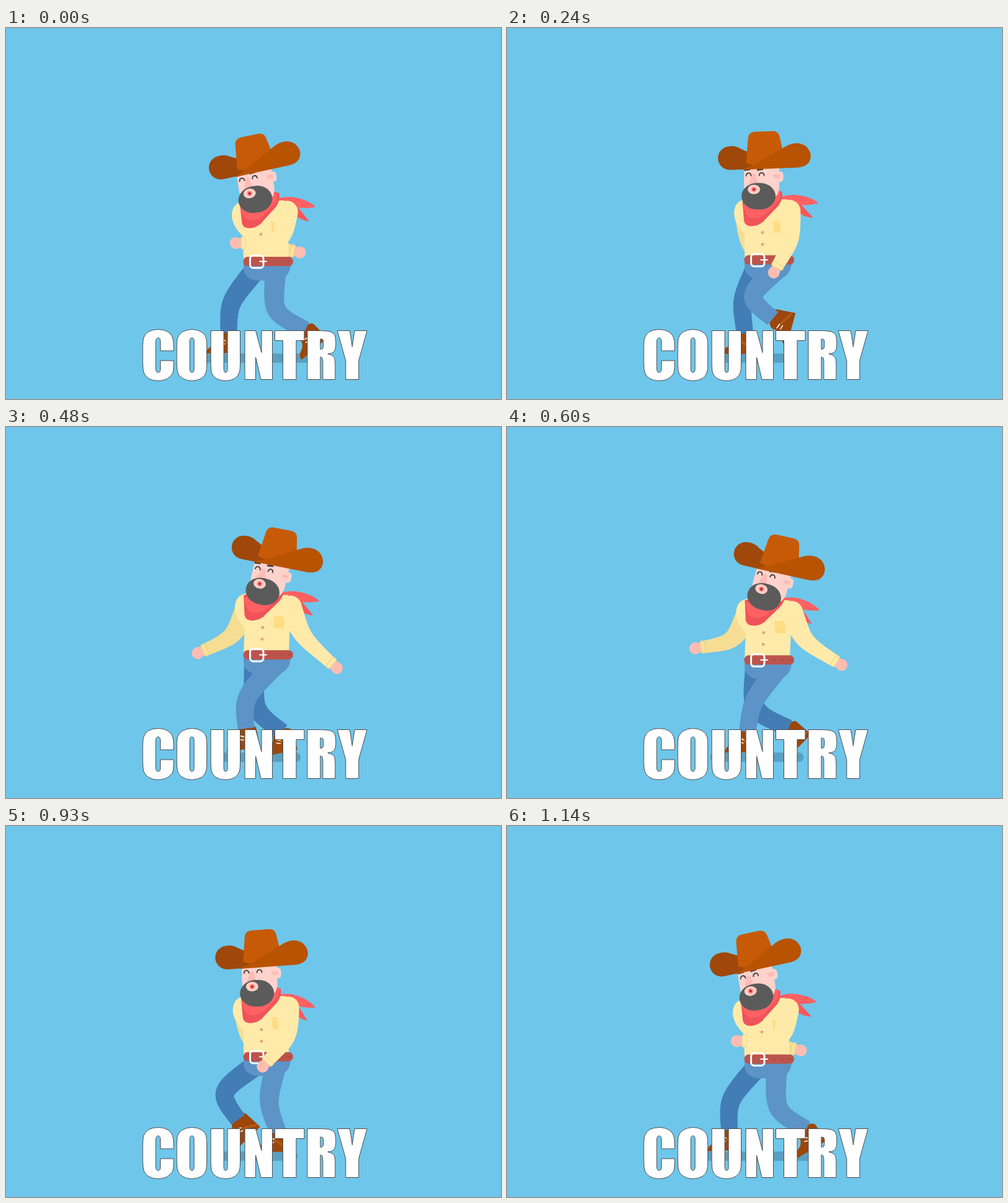
These frames come from a looping animation (800 by 600 pixels, 1.17 s). An HTML page:

```html
<!DOCTYPE html>
<html lang="en">
<head>
<meta charset="utf-8">
<title>Country walk</title>
<style>
html, body { margin: 0; width: 100%; height: 100%; overflow: hidden; background: #6ec6eb; }
svg { display: block; width: 100vw; height: 100vh; }
</style>
</head>
<body>
<svg viewBox="0 0 800 600">
  <defs>
    <g id="boot">
      <path fill="#9c460b" d="M-16 3Q-14-3 0-5Q13-5 16 1L18 33H-36Q-37 25-27 21Q-17 17-16 3Z"/>
      <path stroke="#ae5a18" stroke-width="4" d="M16 27L-11 11"/>
      <path stroke="#fff" stroke-width="1.6" stroke-linecap="round" d="M-13 10L-6 12.5M-13 16L-7 18"/>
    </g>
    <g id="hand" fill="#ffbdb2">
      <circle cx="11" r="9.6"/>
      <rect x="-1" y="-8" width="12" height="16" rx="4"/>
    </g>
  </defs>
  <rect width="800" height="600" fill="#6ec6eb"/>
  <rect id="shadow" y="526.5" height="15" rx="7.5" fill="#5a9fbf"/>

  <use id="bootB" href="#boot"/>
  <path id="legB" fill="#427db6"/>

  <use id="handB" href="#hand"/>
  <path id="armB" fill="#f5dd93"/>
  <rect id="cuffB" x="-5" y="-10" width="7" height="20" rx="3" fill="#f8e29c" stroke="#ecd084" stroke-width="1.2"/>

  <g class="torso">
    <g id="tails" fill="#ff6163">
      <path d="M470 280L494.500 307.500Q482 307 474 301L455 282Z" fill="#f9585b"/>
      <path d="M438 280Q440 270 464 270Q490 272 503.500 284Q487 288.500 470 286Z"/>
    </g>
    <path fill="#ffeaa9" d="M384 378V333Q367 316 367 299Q368 277 390 277H452L457 300V378Z"/>
    <path fill="#ffdc82" d="M430 311.500H448.500L447 331H431.500Z"/>
    <path stroke="#ffe297" stroke-width="1.5" d="M431 316.500H447.500"/>
    <g fill="#e7a177">
      <circle cx="413" cy="312" r="2.400"/><circle cx="413" cy="331" r="2.400"/><circle cx="413" cy="350" r="2.400"/>
    </g>
  </g>

  <path class="bob" fill="#5c94c7" d="M384 378V388Q387 405 408 406H440Q460 400 460 378Z"/>
  <use id="bootF" href="#boot"/>
  <path id="legF" fill="#5c94c7"/>

  <g class="bob">
    <rect x="383.500" y="367.500" width="80.500" height="15" rx="7" fill="#bc544c"/>
    <g fill="#8f3c38"><circle cx="433" cy="375" r="1"/><circle cx="445.500" cy="375" r="1"/><circle cx="458" cy="375" r="1"/></g>
    <rect x="394.500" y="365.500" width="21.500" height="20" rx="5" fill="none" stroke="#fff" stroke-width="3"/>
    <path d="M410 375H421" stroke="#fff" stroke-width="2" stroke-linecap="round"/>
  </g>

  <use id="handF" href="#hand"/>
  <path id="armF" fill="#ffeaa9"/>
  <rect id="cuffF" x="-5" y="-10" width="7" height="20" rx="3" fill="#ffeaa9" stroke="#f3d88c" stroke-width="1.2"/>

  <g class="torso">
    <path fill="#f0545a" d="M380.500 280L383 312Q385 320.500 395 320.500Q406 320.500 414 313L439 287Q447 275 444.500 265L436 262Z"/>
    <path fill="#ff6163" d="M382 284Q385 306 396 307.500Q411 308 419 300L440 278L442 264Z"/>
    <g id="head">
      <path fill="#ffd2cc" d="M383 222H440V257Q440 268 433 274H383Z"/>
      <rect x="430" y="232" width="16.500" height="17" rx="5" fill="#ffd2cc"/>
      <rect x="431" y="237" width="10" height="6" rx="1" fill="#ffbdb4"/>
      <path fill="#ffbcb6" d="M397 236H402L406 253H391Z"/>
      <path fill="none" stroke="#3d3d3d" stroke-width="1.800" stroke-linecap="round" d="M386.500 239Q387 234.500 390.500 234.500T394.500 239M407.500 238.500Q408 234 411.500 234T415.500 238.500"/>
      <path stroke="#4a4040" stroke-width="3" d="M383 229.500L393 228.500M404 229.500L414 228"/>
      <rect x="379" y="250.500" width="55" height="43" rx="25" ry="21.500" fill="#5b5b5b"/>
      <ellipse cx="399" cy="261" rx="10" ry="7.700" fill="#ffcfc5"/>
      <circle cx="399" cy="261" r="4.200" fill="#fb8b87"/>
      <circle cx="399" cy="261" r="2.200" fill="#c0252e"/>
      <g id="hat">
        <path fill="#9f480a" d="M358 191Q369 189 378 195L404 207L400 227.500L362 229A19 19 0 0 1 358 191Z"/>
        <path fill="#c75a06" d="M386 218L389.500 178Q390.500 168 400 167.300L429 166.200Q438.500 166 440.500 175L446 200L402 222Z"/>
        <path fill="#b85302" d="M380 228.700L402 219L453 189.500Q471 181 484 191.500Q496 205 487 218Q481 224.500 469 225.200Z"/>
      </g>
    </g>
  </g>

  <g role="img" aria-label="COUNTRY" fill="#fff" fill-rule="evenodd" stroke="#4c4c4c" stroke-width="1">
    <path d="M271 522H249.500V507Q249.500 501 246 501T242 507V551Q242 557 246 557T249.500 551V538H271V543Q271 555 269 559Q266 564 260 567.500Q254 570.500 246 570.500Q237 570.500 231 567Q225 563.500 223 558Q221 552 221 541V516Q221 506 222.500 501Q224.500 495 230.500 491Q237 487.500 246 487.500Q255 487.500 261 491Q267 494.500 269 500Q271 505 271 515Z"/>
    <path d="M324.500 542Q324.500 552 323.500 556Q321.500 563 316 566.500Q309 570.500 300.500 570.500Q292 570.500 286 567Q279 563 277.500 557Q276 552 276 542V516Q276 506 277 502Q279 495 285 491.500Q292 487.500 300.500 487.500Q309 487.500 315 491Q322 495 323.500 501Q324.500 506 324.500 516ZM304 507Q304 501 300.500 501T297 507V551Q297 557 300.500 557T304 551Z"/>
    <path d="M378.500 489.500V543Q378.500 552 377.500 556Q376 562 370 566.500Q364 570.500 355 570.500Q346 570.500 340 567Q334 563 332.500 558Q331 553 331 541V489.500H352V551Q352 557 355 557T358 551V489.500Z"/>
    <path d="M430.500 489.500V568.500H412L403.500 532.500V568.500H386V489.500H403.500L413 525V489.500Z"/>
    <path d="M482 489.500V505.500H469V568.500H447.500V505.500H434.500V489.500Z"/>
    <path d="M487 489.500H502Q519 489.500 524 491Q529.500 492.500 531.500 497Q533 501 533 510Q533 519 530.500 522.500Q528 526.500 520 527Q527 528.500 529.500 531.500Q532 534 532 546V568.500H512V541Q512 535 511 533.500T508 532V568.500H487ZM508 503V519.500Q511 519.500 512 518T513 512V509Q513 505 512 504T508 503Z"/>
    <path d="M583.500 489.500L570 538V568.500H549V538L535.500 489.500H555.500Q558.500 507 559.500 516Q561 505 563.500 489.500Z"/>
  </g>
</svg>
<script>
const LOOP = 1170, STEP = 30, TAU = 2 * Math.PI;
const { sin, cos } = Math;
const $ = id => document.getElementById(id);
const set = (el, name, value) => el.setAttribute(name, value);
const move = (el, value) => set(el, 'transform', value);
const all = name => document.querySelectorAll(name);

// Tapered bent tube from a to b around joint k, with a round start
function tube(ax, ay, kx, ky, bx, by, r0, r1) {
  const left = [], right = [], n = 22;
  for (let i = 0; i <= n; i++) {
    const u = i / n, v = 1 - u, r = r0 + (r1 - r0) * u;
    const at = (a, k, b) => v * v * v * a + 3 * u * v * k + u * u * u * b;
    const vel = (a, k, b) => v * v * (k - a) + u * u * (b - k);
    const x = at(ax, kx, bx), y = at(ay, ky, by);
    const dx = vel(ax, kx, bx), dy = vel(ay, ky, by), d = Math.hypot(dx, dy) || 1;
    const nx = -dy / d * r, ny = dx / d * r;
    left.push((x + nx).toFixed(2) + ' ' + (y + ny).toFixed(2));
    right.unshift((x - nx).toFixed(2) + ' ' + (y - ny).toFixed(2));
  }
  return `M${left.join('L')}L${right.join('L')}A${r0} ${r0} 0 0 0 ${left[0]}Z`;
}

function arm(side, sx, sy, kx, ky, wx, wy) {
  const turn = Math.atan2(wy - ky, wx - kx) * 360 / TAU;
  set($('arm' + side), 'd', tube(sx, sy, kx, ky, wx, wy, 18, 9.8));
  for (const part of ['hand', 'cuff'])
    move($(part + side), `translate(${wx} ${wy}) rotate(${turn})`);
}

// Both legs share one gait; a is the angle within the stride
function leg(side, a, hipX, hipY, footShift) {
  const wave = (mid, c, s, c2) => mid + c * cos(a) + s * sin(a) + c2 * cos(2 * a);
  const bump = peak => ((1 + cos(a - peak)) / 2) ** 3;
  const kx = wave(hipX - 31, 18, -18, 7), ky = wave(445, 8.5, -6, 7.5);
  const x = wave(428, 48, -5, 8) + footShift, y = 494 - 24 * bump(1.3);
  set($('leg' + side), 'd', tube(hipX, hipY, kx, ky, x, y, 17, 13.5));
  move($('boot' + side), `translate(${x} ${y}) rotate(${-82 * bump(0.95)})`);
}

function draw(t) {
  const stride = TAU * t / LOOP, beat = 4 * TAU * (t + 8) / LOOP;
  const dy = 6.1 * cos(beat) - 3.5;
  const sway = cos(TAU * (t + 15) / LOOP), lean = sway - 0.2, far = sway * sway;

  for (const el of all('.bob')) move(el, `translate(0 ${dy})`);
  for (const el of all('.torso')) move(el, `translate(0 ${dy}) rotate(${-2 * lean} 421 375)`);
  move($('head'), `translate(${1.5 * far} ${1.5 * far}) rotate(${-10.3 * lean} 410 288)`);
  move($('hat'), `translate(0 ${1.3 + 1.5 * sin(beat + 0.3)})`);
  move($('tails'), `rotate(${5.5 + 6.5 * sin(beat - 0.3)} 440 275)`);

  const swing = 75 * sway + 9 * sin(Math.PI * sway), dx = -3.2 * sway;
  arm('B', 387 + dx, 297 + dy + 1.2 * sway,
    385 + 18 * sway, 346 + dy, 389.5 + swing, 383 + 2.5 * sway - 25 * far);
  arm('F', 457 + dx, 296 + dy - 1.2 * sway,
    463 - 16 * sway, 345 + dy, 457 - swing, 390 - 15.5 * sway - 27 * far);
  leg('B', stride + Math.PI, 402, 390 + dy, -28);
  leg('F', stride, 436, 390 + dy, 0);

  const half = 62 + 8 * sway + 22 * far;
  set($('shadow'), 'x', 404 - half);
  set($('shadow'), 'width', 2 * half);
}

const start = performance.now();
function tick() {
  const t = performance.now() - start + 5;
  draw(Math.floor(t / STEP) * STEP % LOOP);
  requestAnimationFrame(tick);
}
tick();
</script>
</body>
</html>
```
